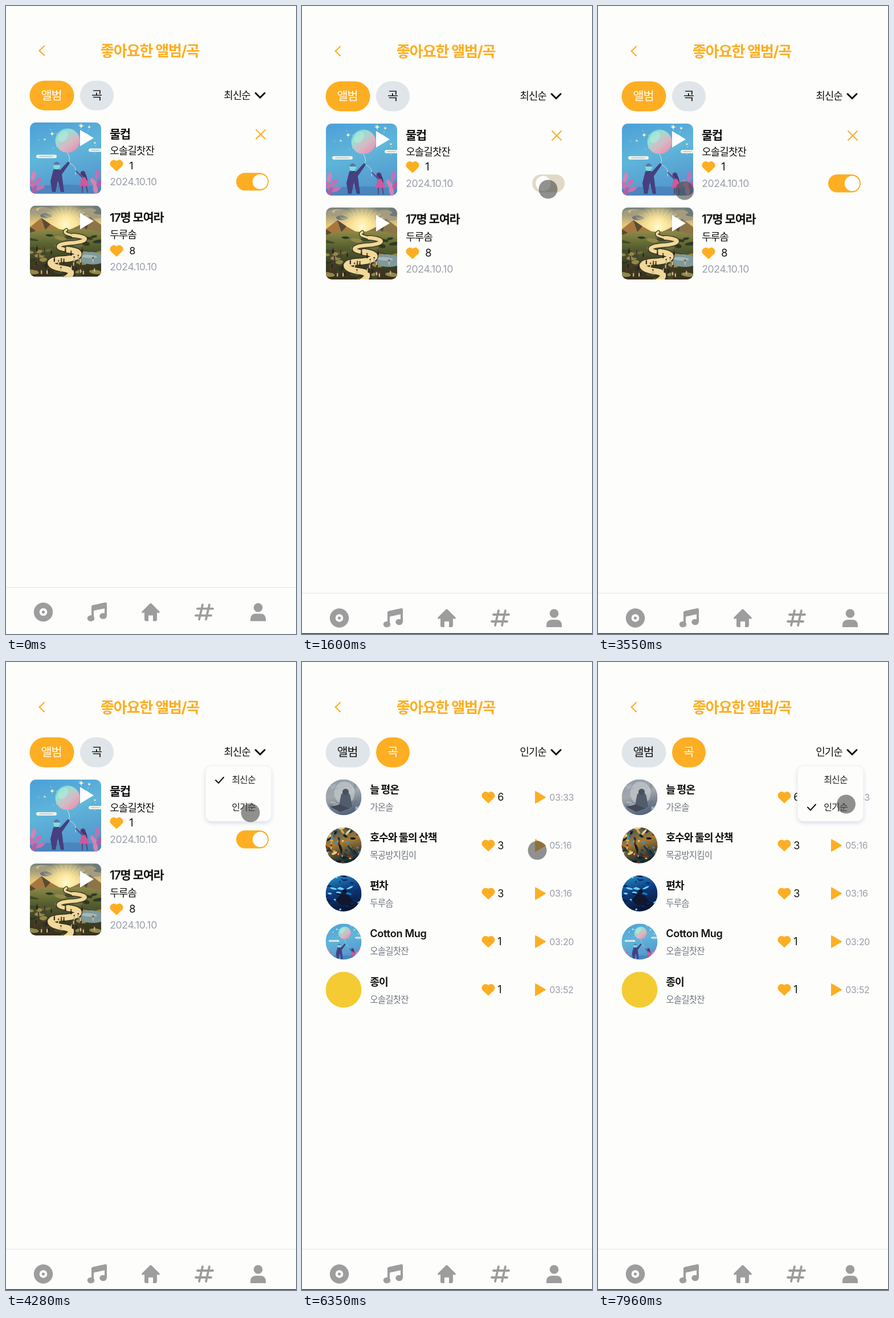
These frames come from a looping animation (509x1100 px, 8000 ms). An HTML page:

```html
<!DOCTYPE html>
<html lang="ko">
<head>
<meta charset="utf-8">
<title>좋아요한 앨범/곡</title>
<style>
html, body { margin: 0; width: 100%; height: 100%; overflow: hidden; background: #fdfdfc; }
svg { display: block; width: 100vw; height: 100vh; }
text { font-family: Inter, "Noto Sans CJK KR", "Noto Sans CJK", sans-serif; letter-spacing: -.02em; white-space: pre; }
.ko { letter-spacing: -.055em; }
.line { fill: none; stroke-linecap: round; stroke-linejoin: round; }
</style>
</head>
<body>
<svg id="stage" viewBox="0 0 509 1100"></svg>
<script>
const ORANGE = '#fdae22', GREY = '#9d9d9d', PILL = '#e0e5ea', DATE = '#9a9fa8';
const LOOP = 8000;

// Text placed by its visible left edge and vertical centre.
const text = (x, cy, size, str, fill = '#111', weight = 400, id = '') =>
  `<text id="${id}" class="${/[가-힣]/.test(str) ? 'ko' : ''}" x="${x - size * .045}" y="${cy + size * .36}" font-size="${size}" font-weight="${weight}" fill="${fill}">${str}</text>`;
const at = (x, y, body, id = '') => `<g id="${id}" transform="translate(${x} ${y})">${body}</g>`;
const use = (ref, x, y) => `<use href="#${ref}" x="${x}" y="${y}"/>`;
const line = (d, color, width) => `<path class="line" d="${d}" stroke="${color}" stroke-width="${width}"/>`;
const shape = (d, fill) => `<path d="${d}" fill="${fill}"/>`;
const dot = (x, y, r, fill) => `<circle cx="${x}" cy="${y}" r="${r}" fill="${fill}"/>`;
const oval = (x, y, rx, ry, fill, turn = 0) =>
  `<ellipse rx="${rx}" ry="${ry}" fill="${fill}" transform="translate(${x} ${y}) rotate(${turn})"/>`;
const box = (x, y, w, h, r, fill, more = '') =>
  `<rect x="${x}" y="${y}" width="${w}" height="${h}" rx="${r}" fill="${fill}" ${more}/>`;
const gradient = (id, x2, ...colors) => `<linearGradient id="${id}" x2="${x2}" y2="1">` +
  colors.map((c, i) => `<stop offset="${i / (colors.length - 1)}" stop-color="${c}"/>`).join('') + '</linearGradient>';

let seed = 7;
const rnd = () => (seed = seed * 16807 % 2147483647) / 2147483647;
const pick = (...list) => list[rnd() * list.length | 0];
const scatter = (n, draw) => Array.from({ length: n }, draw).join('');

const star = (x, y, r) => shape(`M${x} ${y - r}Q${x} ${y} ${x + r} ${y}Q${x} ${y} ${x} ${y + r}Q${x} ${y} ${x - r} ${y}Q${x} ${y} ${x} ${y - r}`, '#f6f3c4');
const leaf = (x, y, turn) => oval(x, y, 4, 9, pick('#c272b0', '#b05fa6', '#d583b0'), turn);

const balloonArt = box(0, 0, 125, 126, 0, 'url(#sky)') +
  scatter(16, () => dot(rnd() * 125, rnd() * 60, .7, '#d8eef0')) +
  star(90, 6, 6) + star(39, 20, 5) + star(104, 8, 4) + star(26, 30, 3) + star(100, 22, 4) + star(114, 36, 3) +
  shape('M0 114Q60 106 125 114V126H0Z', '#4a86bd') +
  leaf(6, 94, 12) + leaf(14, 104, 40) + leaf(4, 109, -25) + leaf(18, 115, 65) + leaf(7, 120, 20) +
  leaf(118, 92, 15) + leaf(112, 106, -35) + leaf(121, 109, 25) + leaf(115, 118, -10) +
  line('M66 54Q72 64 68 70M70 72Q84 78 80 92', '#e4f2f2', .8) +
  dot(66, 32, 21.5, 'url(#balloon)') + oval(58, 24, 8, 11, '#c4efe466', 35) +
  box(11, 57, 36, 6, 3, '#eef3ee') + box(103, 46, 23, 6, 3, '#eef3ee') +
  line('M17 60H40M108 49H122', '#9cacb4', 1) +
  shape('M41 84Q46 81 53 84L67 69L70 72L56 92L60 123H54L49 103L45 123H39L36 104Z', '#463f80') +
  dot(47, 77, 6, '#7fded0') + shape('M41 75Q47 64 53 75Z', '#5f6fb4') +
  dot(93, 90, 4.5, '#5b3c79') + shape('M91 88Q100 88 101 104L94 100Z', '#49346f') +
  shape('M91 96L97 97L105 113H87Z', '#d0589b') + line('M92 97L81 86M92 113V123M99 113L101 123', '#60477f', 2.2);

const road = [['M64 43C56 48 66 51 76 53', 4], ['M76 53C108 56 100 64 72 66C42 68 46 77 66 78', 6.5],
  ['M66 78C98 81 88 94 55 95C25 97 34 109 61 112C75 114 76 122 62 130', 10.5]];
const roadLayer = (color, extra) => road.map(([d, w]) => line(d, color, w + extra)).join('');

const valleyArt = box(0, 0, 125, 60, 0, 'url(#dawn)') +
  scatter(14, (_, i) => oval(i % 2 ? rnd() * 36 : 90 + rnd() * 35, 3 + rnd() * 17, 11, 4, pick('#6f7a79', '#a59c80', '#d1c192'))) +
  dot(63, 34, 42, 'url(#sun)') +
  scatter(17, (_, i) => {
    const a = Math.PI * (1 + i / 16);
    return line(`M${63 + 12 * Math.cos(a)} ${36 + 12 * Math.sin(a)}L${63 + 46 * Math.cos(a)} ${36 + 34 * Math.sin(a)}`, '#fff3b877', 1);
  }) +
  shape('M0 38L20 22L36 33L52 42L70 46L0 62Z', '#a8773f') + shape('M125 34L106 20L92 32L76 40L60 46L125 62Z', '#8c7449') +
  shape('M20 22L27 43L36 33ZM106 20L99 44L92 32ZM0 38V54L10 44Z', '#584c36') +
  shape('M0 48Q30 38 63 43Q96 38 125 48V126H0Z', 'url(#land)') +
  scatter(40, () => oval(rnd() * 125, 52 + rnd() * 74, 5 + rnd() * 7, 2 + rnd() * 2, pick('#2f3822', '#6b6c3a', '#3f4b2c', '#94884a'), -12 + rnd() * 24)) +
  oval(108, 93, 24, 11, '#7f9a9c', 4) + oval(104, 90, 14, 3, '#a6b8b2', 4) +
  roadLayer('#33301d', 2.5) + roadLayer('#f0d899', 0) +
  scatter(34, () => {
    const x = 6 + rnd() * 114, y = 72 + rnd() * 46;
    return line(`M${x} ${y}v4.5`, pick('#2a211b', '#4c3326', '#cbb78e'), 2.2) + dot(x, y - 2.5, 1.4, '#5b3c2e');
  });

const greyArt = box(0, 0, 63, 63, 0, 'url(#mist)') +
  scatter(22, () => oval(rnd() * 63, rnd() * 63, 5, 2, pick('#b8bcc299', '#596a8255'), rnd() * 180)) +
  oval(33, 24, 18, 20, '#c7cbd0aa') +
  shape('M23 49L27 27Q36 15 43 28L47 48L35 53Z', '#525d6c') + dot(35, 22, 5.5, '#48515d') +
  shape('M8 48L25 44L42 51L25 57Z', '#424a57');
const paintArt = box(0, 0, 63, 63, 0, 'url(#paint)') +
  scatter(70, () => oval(rnd() * 63, rnd() * 63, 6 * rnd() + 1, 2,
    pick('#163b51', '#d9a444', '#3d8fb5', '#76391f', '#e4ce8a', '#132027', '#1a2530'), rnd() * 180));
const neonArt = box(0, 0, 63, 63, 0, 'url(#neon)') +
  scatter(46, () => oval(rnd() * 63, rnd() * 63, 6 * rnd() + 1, 1.6,
    pick('#092c67', '#1481c7', '#70d7f2', '#081833'), -25 + rnd() * 50)) +
  shape('M17 43L29 31L42 36L50 48L28 52Z', '#10172e') + dot(33, 28, 4, '#10172e');
const yellowArt = box(0, 0, 63, 63, 0, '#f4cb32');

const defs = '<defs>' +
  gradient('sky', .3, '#4c9fd8', '#5fb6d9', '#5498cf') + gradient('balloon', .8, '#63cfd6', '#9adfd0', '#d9b7c4', '#e38fb4') +
  gradient('dawn', 0, '#75807a', '#e2c67c', '#f3d27c') + gradient('land', 0, '#8d8a48', '#56602f', '#3d3f24', '#39301c') +
  gradient('mist', .3, '#8d99a8', '#a3a8ad', '#59687f') +
  gradient('paint', .3, '#234e70', '#a97b32', '#172d34') + gradient('neon', .3, '#2598cf', '#0e3d84', '#0a1836') +
  `<radialGradient id="sun"><stop stop-color="#fffbd4"/><stop offset=".3" stop-color="#ffe9a0"/><stop offset="1" stop-color="#ffe48c" stop-opacity="0"/></radialGradient>
  <filter id="shadow" x="-20%" y="-20%" width="140%" height="150%"><feDropShadow dx="0" dy="3" stdDeviation="3" flood-color="#56608a" flood-opacity=".2"/></filter>
  <clipPath id="square">${box(0, 0, 125, 126, 10, '#000')}</clipPath>
  <clipPath id="round">${dot(31.5, 31.5, 31.5, '#000')}</clipPath>
  <path id="heart" d="M0 10L-9.8 .8A6.4 6.4 0 0 1 0-7.4A6.4 6.4 0 0 1 9.8 .8Z" fill="${ORANGE}" stroke="${ORANGE}" stroke-linejoin="round"/>
  <path id="play" d="M0-10L17 0L0 10Z" fill="${ORANGE}" stroke="${ORANGE}" stroke-width="2" stroke-linejoin="round"/>
  <g id="balloonArt">${balloonArt}</g></defs>`;

// Rows are given as vertical centres below the top of the cover.
const album = (id, art, title, artist, likes, [name, heart, date], extra = '') => at(42, 206, `
  <g clip-path="url(#square)">${art}</g>${shape('M88 13L112 27.5L88 42Z', '#fff')}
  ${text(141, 21, 20.8, title, '#111', 600)}${text(141, name, 18, artist)}
  ${use('heart', 152, heart)}${text(175, heart, 18, likes)}${text(141, date, 17.6, '2024.10.10', DATE)}${extra}`, id);

const toggle = line('M397 13L413 29M413 13L397 29', ORANGE, 2) +
  box(362, 89, 57, 31.5, 15.75, ORANGE, 'id="track"') + '<circle id="knob" cy="104.8" r="13.2" fill="#fff"/>';

const song = ([art, title, artist, likes, time], i) => at(0, 237 + i * 84.25, `
  <g transform="translate(41.5 -31.5)" clip-path="url(#round)">${art}</g>
  ${text(120, -14, 18.2, title, '#111', 600)}${text(120, 17, 15.6, artist, '#70767d')}
  ${use('heart', 327, 0)}${text(344, 0, 18, likes)}${use('play', 410, 0)}${text(435, 0, 16, time, DATE)}`);

const songs = [
  [greyArt, '늘 평온', '가온솔', 6, '03:33'],
  [paintArt, '호수와 둘의 산책', '목공방지킴이', 3, '05:16'],
  [neonArt, '편차', '두루솜', 3, '03:16'],
  ['<g transform="scale(.504)"><use href="#balloonArt"/></g>', 'Cotton Mug', '오솔길찻잔', 1, '03:20'],
  [yellowArt, '종이', '오솔길찻잔', 1, '03:52'],
];

const nav = box(0, 1028, 509, 1, 0, '#dfe6f1') +
  at(65.5, 1072, dot(0, 0, 16.7, GREY) + dot(0, 0, 6.8, '#fdfdfc') + dot(0, 0, 2.6, GREY)) +
  at(160, 1072, line('M-8 10V-10L15-15V6', GREY, 4) + shape('M-8-12L15-17V-7L-8-2Z', GREY) +
    oval(-11, 11, 6.3, 5.3, GREY) + oval(10.5, 7, 6.3, 5.3, GREY)) +
  at(254, 1072, shape('M-11 0V13Q-11 16 -8 16H-4V6H4V16H8Q11 16 11 13V0Z', GREY) +
    shape('M-15 1L0-14L15 1Z', GREY) + line('M-14 0L0-14L14 0', GREY, 3.4)) +
  at(348, 1072, line('M-3-13L-9 13M9-13L3 13M-12-6H15M-15 6H12', GREY, 3.8)) +
  at(442.5, 1072, dot(0, -8, 7.8, GREY) + shape('M-13.5 16V13Q-13.5 3 -4 3H4Q13.5 3 13.5 13V16Z', GREY));

const menu = `<g id="menu">${box(350, 182, 116, 97, 11, '#fdfdfc', 'stroke="#eceef3" filter="url(#shadow)"')}
  ${text(397, 206.5, 16, '최신순', '#222')}${text(397, 254, 16, '인기순', '#222')}
  <g id="check">${line('M368 207L373 212L382 202', '#111', 2)}</g></g>`;

stage.innerHTML = defs + `<g id="page">
  ${line('M67 71L58.5 79L67 87', ORANGE, 2.2)}${text(167, 79, 26.4, '좋아요한 앨범/곡', ORANGE, 700)}
  ${box(41.5, 132, 78, 52.5, 26.2, ORANGE, 'id="pillA"')}${text(62.5, 158, 20.8, '앨범', '#fff', 400, 'tabA')}
  ${box(130, 132, 59, 52.5, 26.2, PILL, 'id="pillB"')}${text(151, 158, 20.8, '곡', '#111', 400, 'tabB')}
  ${text(383, 158, 18, '최신순', '#111', 400, 'sort')}
  <path d="M438 154L446 162L454 154" fill="none" stroke="#111" stroke-width="3" stroke-linecap="round"/>
  <g id="albums">
    ${album('first', use('balloonArt', 0, 0), '물컵', '오솔길찻잔', 1, [50, 76, 105], toggle)}
    ${album('second', valleyArt, '17명 모여라', '두루솜', 8, [51.5, 80, 108])}
  </g>
  <g id="songs">${songs.map(song).join('')}</g>
  ${menu}${nav}</g>
  <rect id="edge" y="1098.7" width="509" height="1.3" fill="#222"/>
  <circle id="cursor" r="16.5" fill="#484848" fill-opacity=".6"/>`;

const $ = id => document.getElementById(id);
const set = (id, attrs) => Object.entries(attrs).forEach(([k, v]) => $(id).setAttribute(k, v));
const show = (id, on) => { $(id).style.display = on ? '' : 'none'; };
const ramp = (t, a, b) => {
  const p = Math.min(1, Math.max(0, (t - a) / (b - a)));
  return p * p * (3 - 2 * p);
};
const mix = (a, b, p) => a + (b - a) * p;

// Pointer path: time, x, y
const path = [
  [1000, 410, 1118], [1460, 432, 321], [2120, 432, 321], [2500, 199.5, 332], [2750, 130, 336],
  [3490, 130, 336], [3860, 432, 162], [3980, 432, 162], [4280, 429, 264], [4610, 429, 264],
  [4760, 502, 343], [5220, 502, 343], [5440, 162, 160], [5660, 162, 160], [5860, 413, 330],
  [6350, 413, 330], [6450, 416, 322], [6680, 416, 322], [7460, 437, 162], [7700, 437, 162], [7950, 435.5, 249],
];
function pointer(t) {
  const i = path.findIndex(p => p[0] > t);
  if (i < 1) return path[i < 0 ? path.length - 1 : 0].slice(1);
  const [a, b] = [path[i - 1], path[i]], p = ramp(t, a[0], b[0]);
  return [mix(a[1], b[1], p), mix(a[2], b[2], p)];
}

function draw(t) {
  const popular = t >= 4400, inSongs = t >= 5650;
  set('page', { transform: `scale(1 ${t < 90 ? .9903 : t < 180 ? .995 : 1})` });
  show('edge', t >= 180);

  const off = ramp(t, 1510, 1625) - ramp(t, 1960, 2100);
  set('knob', { cx: mix(404, 378.5, off) });
  set('track', { fill: `rgb(${mix(253, 222, off)},${mix(174, 222, off)},${mix(34, 220, off)})` });

  set('first', { transform: `translate(42 ${popular ? 353 : 206})` });
  set('second', { transform: `translate(42 ${popular ? 206 : 353})` });
  $('sort').textContent = popular ? '인기순' : '최신순';
  show('albums', !inSongs);
  show('songs', inSongs);
  set('pillA', { fill: inSongs ? PILL : ORANGE });
  set('pillB', { fill: inSongs ? ORANGE : PILL });
  set('tabA', { fill: inSongs ? '#111' : '#fff' });
  set('tabB', { fill: inSongs ? '#fff' : '#111' });

  show('menu', t >= 3930 && t < 4400 || t >= 7640);
  set('check', { transform: `translate(0 ${popular ? 47.5 : 0})` });

  const [cx, cy] = pointer(t);
  set('cursor', { cx, cy });
}

const start = performance.now();
(function frame() {
  draw((performance.now() - start) % LOOP);
  requestAnimationFrame(frame);
})();
</script>
</body>
</html>
```
